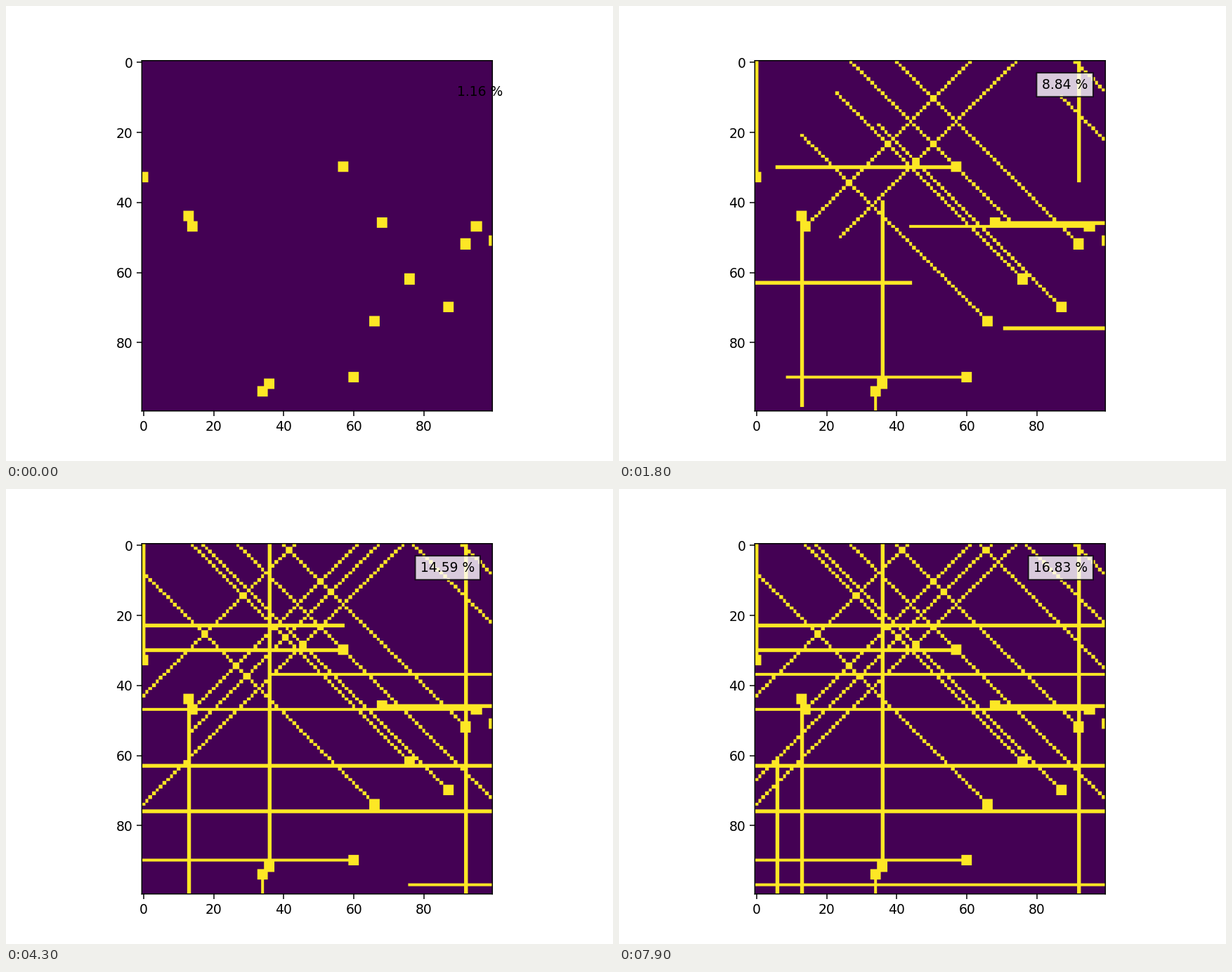
Write a matplotlib script that moves like this. It is 864 px wide and 648 px high and loops after 8 s.

```python
import matplotlib.pyplot as plt
import numpy as np
from matplotlib.animation import FuncAnimation
from matplotlib.patches import PathPatch
from matplotlib.path import Path

SIZE = 100
FRAMES = 80
STEPS_PER_FRAME = 3
CELL = 3.696  # cell width in pixels at 100 dpi

# Rays leave seeds in and around the visible window: heading, x, y.
SEEDS = [
    ("N", 0, 33), ("S", 13, 44), ("NE", 14, 47), ("NW", 66, 74),
    ("NW", 76, 62), ("S", 34, 94), ("NW", 87, 70), ("NW", 92, 52),
    ("N", 36, 92), ("E", 100, 51), ("W", 57, 30), ("W", 60, 90),
    ("E", 68, 46), ("W", 95, 47), ("SW", 78, -4), ("SE", 20, -7),
    ("E", -10, 63), ("SE", 75, -16), ("S", 92, -19), ("W", 124, 76),
    ("NW", 140, 63), ("W", 164, 37), ("NE", -69, 112), ("E", -70, 23),
    ("SW", 140, -73), ("W", 203, 97), ("NW", 263, 199), ("N", 6, 296),
]


def delay(index):
    """Seeds set off in groups of four, zero to three steps late."""
    return (index + 2) // 4 % 4


def heading(name):
    return ("E" in name) - ("W" in name), ("S" in name) - ("N" in name)


def fill(grid, x, y):
    inside = (x >= 0) & (x < SIZE) & (y >= 0) & (y < SIZE)
    grid[y[inside], x[inside]] = True


def grid_at(step):
    grid = np.zeros((SIZE, SIZE), bool)
    block_y, block_x = np.mgrid[-1:2, -1:2]
    for i, (name, x, y) in enumerate(SEEDS):
        dx, dy = heading(name)
        run = np.arange(step - delay(i) + 1)
        fill(grid, x + block_x, y + block_y)
        fill(grid, x + dx * run, y + dy * run)
    return grid


def edges(offset):
    """Cell borders in data units, rounded to whole 100 dpi pixels."""
    pixels = np.rint(np.arange(SIZE + 1) * CELL)
    return (pixels - offset) / CELL - 0.5


EDGES_X, EDGES_Y = edges(0.2), edges(0.6)


def cells_path(grid):
    """One outline for all lit cells, so that neighbours join without seams."""
    row, col = np.nonzero(grid)
    left, right = EDGES_X[col], EDGES_X[col + 1]
    top, bottom = EDGES_Y[row], EDGES_Y[row + 1]
    xs = np.stack([left, right, right, left, left], axis=1)
    ys = np.stack([top, top, bottom, bottom, top], axis=1)
    codes = [Path.MOVETO] + [Path.LINETO] * 3 + [Path.CLOSEPOLY]
    return Path(np.column_stack([xs.ravel(), ys.ravel()]),
                np.tile(codes, len(row)))


plt.rcParams["path.snap"] = False
dark, bright = plt.cm.viridis([0.0, 1.0])

fig, ax = plt.subplots(figsize=(6.4, 4.8), dpi=135)
ax.set(xlim=(-0.5, SIZE - 0.5), ylim=(SIZE - 0.5, -0.5),
       aspect="equal", facecolor=dark)
cells = ax.add_patch(PathPatch(cells_path(grid_at(0)), fc=bright, lw=0))
plain = ax.text(0.9, 0.9, "", transform=ax.transAxes)
boxed = ax.text(0.95, 0.95, "", transform=ax.transAxes, ha="right", va="top",
                bbox=dict(facecolor="white", alpha=0.8))


def update(frame):
    grid = grid_at(frame * STEPS_PER_FRAME)
    cells.set_path(cells_path(grid))
    label = f"{100 * grid.mean():.2f} %"
    for text, shown in ((plain, frame == 0), (boxed, frame > 0)):
        text.set_text(label)
        text.set_visible(shown)
    return cells, plain, boxed


anim = FuncAnimation(fig, update, frames=FRAMES, interval=100,
                     repeat=True, repeat_delay=0)
plt.show()
```
